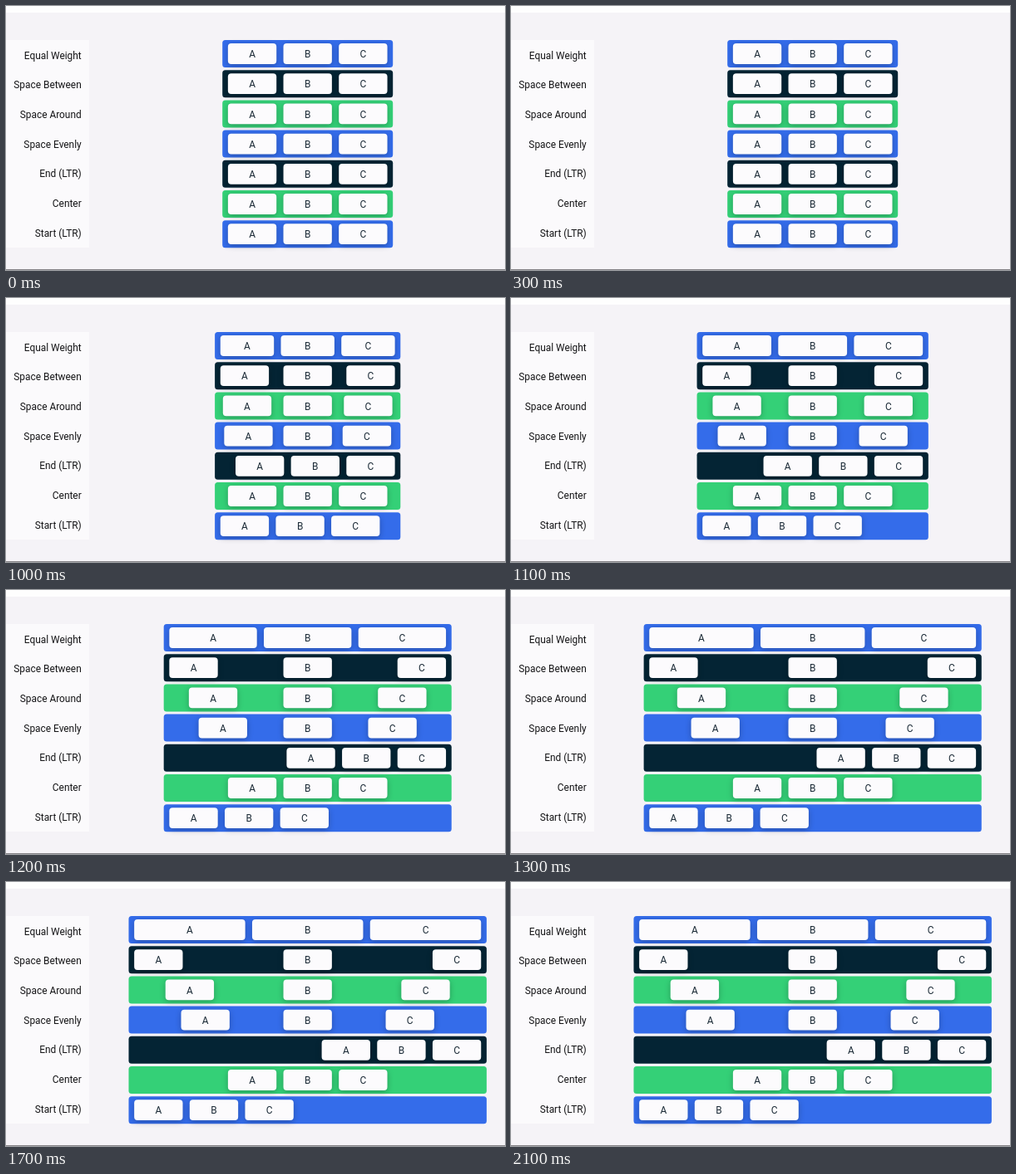
An HTML page with a canvas for the animation above (2200 ms loop, 600 by 318 pixels).

```html
<!DOCTYPE html>
<html lang="en">
<head>
<meta charset="utf-8">
<title>Row arrangements</title>
<style>
  html, body { margin: 0; width: 100%; height: 100%; overflow: hidden; background: #f5f3f7; }
  canvas { display: block; width: 600px; height: 318px; }
</style>
</head>
<body>
<canvas id="stage" width="600" height="318"></canvas>
<script>
const ctx = document.getElementById('stage').getContext('2d');

const LOOP = 2200, STEP = 100;
const CENTER = 362.7, NARROW = 205, WIDE = 430.4;
const TOP = 41, PITCH = 36.2, BAR_H = 33;
const PAD = 2.5, MARGIN = 4.15, ITEM = 66.65;
const CHIP_H = 24.8;
const BLUE = '#346cea', NAVY = '#042434', GREEN = '#34d077';

// Each layout takes the free space and returns [leading offset, extra gap].
const rows = [
  { label: 'Equal Weight', color: BLUE, stretch: true, layout: () => [0, 0] },
  { label: 'Space Between', color: NAVY, layout: free => [0, free / 2] },
  { label: 'Space Around', color: GREEN, layout: free => [free / 6, free / 3] },
  { label: 'Space Evenly', color: BLUE, layout: free => [free / 4, free / 4] },
  { label: 'End (LTR)', color: NAVY, layout: free => [free, 0] },
  { label: 'Center', color: GREEN, layout: free => [free / 2, 0] },
  { label: 'Start (LTR)', color: BLUE, layout: () => [0, 0] }
];

// Time in ms against fraction of the widening; the pace picks up briefly midway.
const pace = [[864, 0], [1000, 0.163], [1200, 0.406], [1300, 0.622], [1500, 0.856], [1620, 1]];

function fraction(t) {
  if (t <= pace[0][0]) return 0;
  for (let i = 1; i < pace.length; i++) {
    const [t0, v0] = pace[i - 1], [t1, v1] = pace[i];
    if (t <= t1) return v0 + (v1 - v0) * (t - t0) / (t1 - t0);
  }
  return 1;
}

// cubic-bezier(0.4, 0, 0.2, 1)
function ease(x) {
  let lo = 0, hi = 1;
  for (let i = 0; i < 24; i++) {
    const s = (lo + hi) / 2, r = 1 - s;
    if (1.2 * r * r * s + 0.6 * r * s * s + s * s * s < x) lo = s; else hi = s;
  }
  return lo * lo * (3 - 2 * lo);
}

function box(x, y, w, h, radius, color) {
  ctx.fillStyle = color;
  ctx.beginPath();
  ctx.roundRect(x, y, w, h, radius);
  ctx.fill();
}

function text(str, x, y, align, color) {
  ctx.textAlign = align;
  ctx.fillStyle = color;
  ctx.fillText(str, x, y);
}

function chip(x, y, w, letter) {
  ctx.save();
  ctx.shadowColor = 'rgba(0, 0, 0, 0.26)';
  ctx.shadowBlur = 7;
  ctx.shadowOffsetY = 2;
  box(x, y, w, CHIP_H, 4, '#fcfbfd');
  ctx.restore();
  text(letter, x + w / 2, y + 17, 'center', '#1d2c38');
}

function drawRow(row, i, width) {
  const left = CENTER - width / 2, y = TOP + i * PITCH;
  const inner = width - 2 * PAD;
  const item = row.stretch ? inner / 3 : ITEM;
  const [lead, gap] = row.layout(Math.max(0, inner - 3 * item));

  box(left, y, width, BAR_H, 3.5, row.color);
  [...'ABC'].forEach((letter, k) => {
    const x = left + PAD + lead + k * (item + gap);
    chip(x + MARGIN, y + 4.1, item - 2 * MARGIN, letter);
  });
}

function draw(t) {
  ctx.fillStyle = '#f5f3f7';
  ctx.fillRect(0, 0, 600, 318);
  ctx.fillStyle = '#fefefe';
  ctx.fillRect(0, 0, 600, 8);
  ctx.fillStyle = '#fbfafc';
  ctx.fillRect(0, 41, 100, 250);
  ctx.fillStyle = '#858387';
  ctx.fillRect(0, 317, 600, 1);

  const width = NARROW + (WIDE - NARROW) * ease(fraction(t));
  ctx.font = '11.9px Roboto, sans-serif';
  rows.forEach((row, i) => {
    text(row.label, 90.7, 63.5 + i * 35.68, 'right', '#151517');
    drawRow(row, i, width);
  });
}

const start = performance.now();
function tick() {
  const t = (performance.now() - start) % LOOP;
  draw(Math.floor(t / STEP) * STEP);
  requestAnimationFrame(tick);
}
tick();
</script>
</body>
</html>
```
